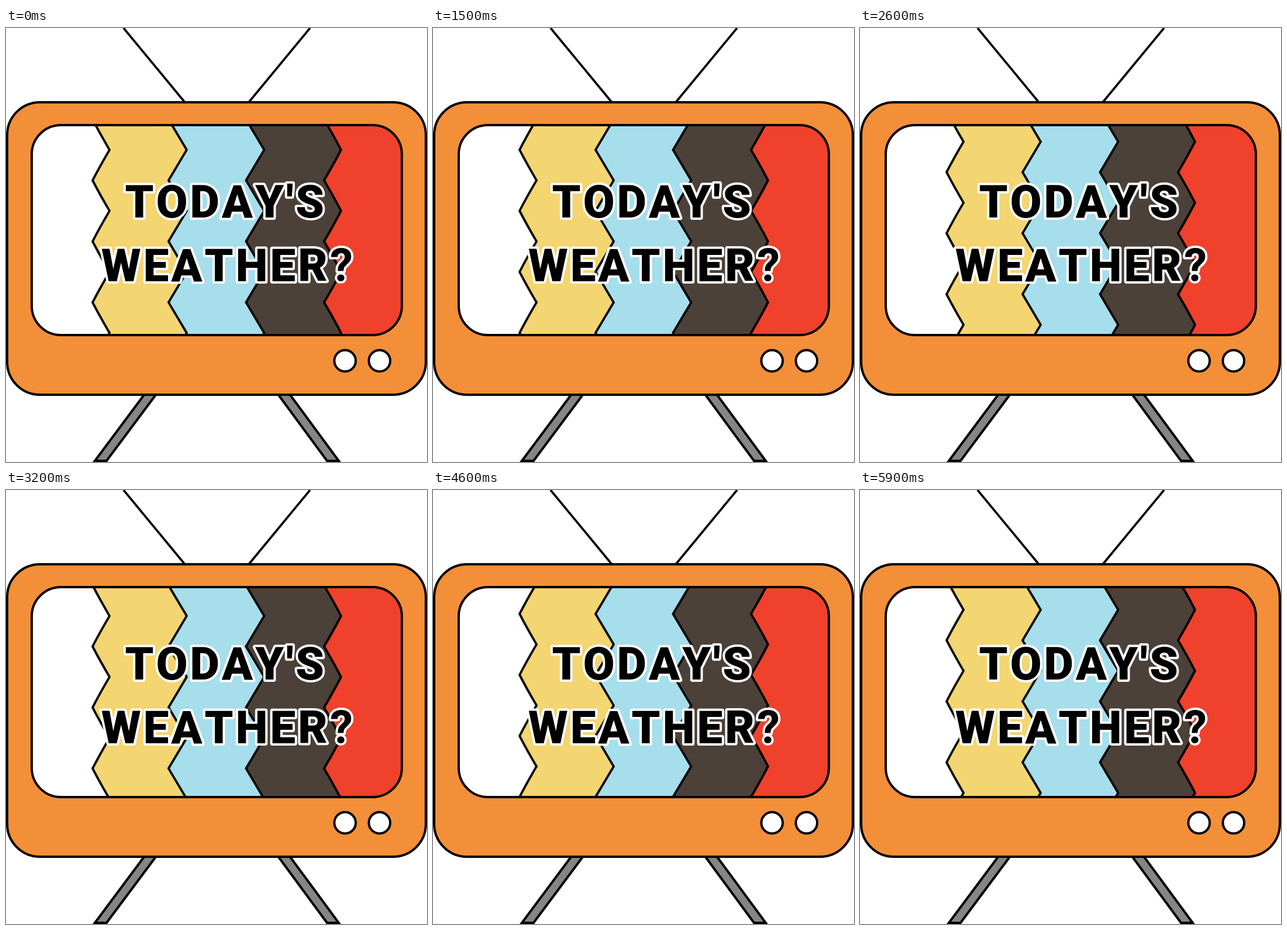
Write an HTML page without scripts that moves like this. It is 720 px wide and 742 px high and loops after 6000 ms.

```html
<!DOCTYPE html>
<html lang="en">
<head>
<meta charset="utf-8">
<title>Weather TV</title>
<style>
  html, body { margin: 0; width: 100%; height: 100%; overflow: hidden; background: #fff; }
  svg { display: block; width: 720px; height: 742px; }
  .line { stroke: #000; stroke-width: 4; }

  .scroll { animation: scroll 3s -5ms steps(30) infinite; }
  .inner, .outer { stroke: #000; }
  .inner { animation: inner 2s -5ms step-end infinite; }
  .outer { animation: outer 2s -5ms step-end infinite; }

  @keyframes scroll { to { transform: translateY(104.3px); } }

  /* The zigzags jump to a wide swing for a moment, with thinner lines. */
  @keyframes inner {
    0%, 45%, 100% {
      stroke-width: 3.8;
      d: path("M15.5 0l-31 52.15 31 52.15-31 52.15 31 52.15-31 52.15 31 52.15-31 52.15 31 52.15-31 52.15 31 52.15-31 52.15 31 52.15H500V0z");
    }
    35% {
      stroke-width: 2.4;
      d: path("M40 0l-80 52.15 80 52.15-80 52.15 80 52.15-80 52.15 80 52.15-80 52.15 80 52.15-80 52.15 80 52.15-80 52.15 80 52.15H500V0z");
    }
    40% {
      stroke-width: 2.1;
      d: path("M46.5 0l-93 52.15 93 52.15-93 52.15 93 52.15-93 52.15 93 52.15-93 52.15 93 52.15-93 52.15 93 52.15-93 52.15 93 52.15H500V0z");
    }
  }
  @keyframes outer {
    0%, 45%, 100% {
      stroke-width: 3.8;
      d: path("M177 0q-16 27-29 52.15 13 25 29 52.15-16 27-29 52.15 13 25 29 52.15-16 27-29 52.15 13 25 29 52.15-16 27-29 52.15 13 25 29 52.15-16 27-29 52.15 13 25 29 52.15-16 27-29 52.15 13 25 29 52.15H-50V0z");
    }
    35% {
      stroke-width: 2.4;
      d: path("M201.5 0q-48 31-71 52.15 23 21 71 52.15-48 31-71 52.15 23 21 71 52.15-48 31-71 52.15 23 21 71 52.15-48 31-71 52.15 23 21 71 52.15-48 31-71 52.15 23 21 71 52.15-48 31-71 52.15 23 21 71 52.15H-50V0z");
    }
    40% {
      stroke-width: 2.1;
      d: path("M208 0q-59 33-80.5 52.15 21.5 19 80.5 52.15-59 33-80.5 52.15 21.5 19 80.5 52.15-59 33-80.5 52.15 21.5 19 80.5 52.15-59 33-80.5 52.15 21.5 19 80.5 52.15-59 33-80.5 52.15 21.5 19 80.5 52.15-59 33-80.5 52.15 21.5 19 80.5 52.15H-50V0z");
    }
  }

  text {
    font: 900 78px Roboto, sans-serif;
    font-kerning: none;
    letter-spacing: 4px;
    stroke: #fff;
    stroke-width: 8;
    stroke-linejoin: round;
    paint-order: stroke;
  }
  .mark { font-weight: 700; }
</style>
</head>
<body>
<svg viewBox="0 0 720 742">
  <clipPath id="screen"><rect x="44" y="166" width="633" height="359" rx="50"/></clipPath>

  <path d="M201 0L305 126M520 0L416 126" stroke="#000" stroke-width="3.7"/>
  <path class="line" fill="#858585" d="M237 626h20L172 740h-20zM465 626h20L569 740h-20z"/>
  <rect class="line" x="2" y="127" width="716" height="500" rx="56" fill="#f38f38"/>

  <g clip-path="url(#screen)">
    <rect y="160" width="720" height="370" fill="#f3d571"/>
    <g transform="translate(0 -.3)">
      <g class="scroll">
        <path class="inner" fill="#a6deec" transform="translate(293.5)"/>
        <path class="inner" fill="#4c4138" transform="translate(426)"/>
        <path class="outer" fill="#fff"/>
        <path class="outer" fill="#f0412c" transform="translate(721 -52.15) scale(-1 1)"/>
      </g>
    </g>
  </g>
  <rect class="line" x="44" y="166" width="633" height="359" rx="50" fill="none"/>

  <g class="line" fill="#fff">
    <circle cx="579.8" cy="569" r="18.3"/>
    <circle cx="638.8" cy="569" r="18.3"/>
  </g>

  <text x="203.5" y="324">TODAY'S</text>
  <text x="163" y="432.5">WEATHER<tspan class="mark">?</tspan></text>
</svg>
</body>
</html>
```
